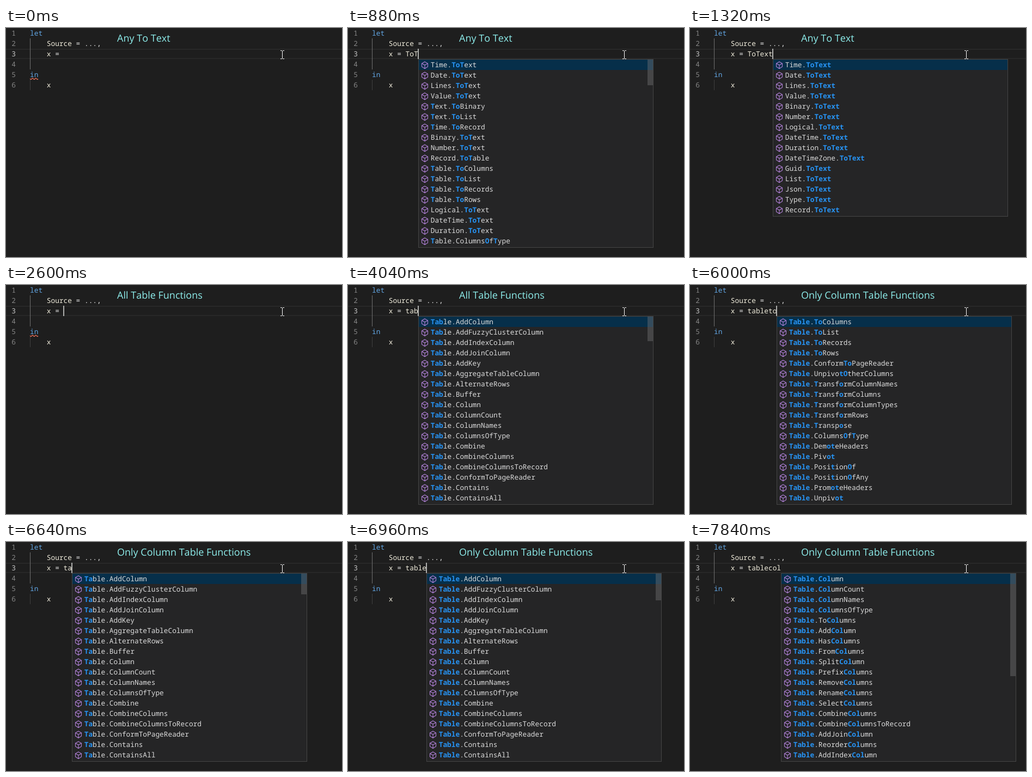
These frames come from a looping animation (617 px wide and 420 px high, 8 s). An HTML page:

```html
<!DOCTYPE html>
<html lang="en">
<head>
<meta charset="utf-8">
<title>Code completion</title>
<style>
  html, body { margin: 0; width: 100%; height: 100%; overflow: hidden; background: #1e1e1e; }
  #stage {
    position: relative; width: 617px; height: 420px; overflow: hidden; background: #1e1e1e;
    color: #dcdcdc; font: 12.82px/19px "Noto Sans Mono", "DejaVu Sans Mono", monospace;
    text-rendering: geometricPrecision; font-variant-ligatures: none; white-space: pre;
  }
  #stage > * { position: absolute; }
  #numbers { left: 0; top: 0; width: 18px; text-align: right; color: #858585; }
  #numbers b { color: #c6c6c6; font-weight: 400; }
  #line { left: 0; top: 38px; width: 617px; height: 19px; box-sizing: border-box; border: solid #282828; border-width: 2px 0; }
  #code { left: 44px; top: 0; color: #ececec; font-weight: 500; }
  #code i { color: #62a6e4; font-style: normal; font-weight: 400; }
  #code u { color: #f0ecdc; text-decoration: none; }
  .guide { left: 44px; width: 1px; }
  #caret { top: 38px; width: 2px; height: 19px; background: #aeafad; }
  #title { left: 204px; top: 7px; color: #8eeeec; font: 18px/24px "Open Sans", "Noto Sans", sans-serif; font-kerning: none; }
  #menu { top: 57px; width: 432px; box-sizing: border-box; background: #252526; border: 1px solid #454545; }
  .row { position: relative; height: 19px; padding-left: 21.7px; }
  .row:first-child { background: #062f4a; }
  .row svg { position: absolute; left: 4px; top: 3px; }
  .row b { color: #2794f5; font-weight: 600; }
  #thumb { position: absolute; right: 0; top: 0; width: 10px; background: rgba(121, 121, 121, .4); }
  #marks { left: 0; top: 0; fill: none; }
</style>
</head>
<body>
<div id="stage">
  <div id="line"></div>
  <div id="numbers">1
2
<b>3</b>
4
5
6</div>
  <div class="guide" style="top:19px;height:57px;background:#707070"></div>
  <div class="guide" style="top:95px;height:19px;background:#404040"></div>
  <div id="code"><i>let</i>
    <u>Source</u> = ...,
    <u>x</u> = <u id="typed"></u>

<i>in</i>
    <u>x</u></div>
  <div id="caret"></div>
  <div id="title"></div>
  <div id="menu"></div>
  <svg id="marks" width="617" height="420">
    <path id="squiggle" d="M44 93l1.800 1.500 3-2.400 3 2.400 3-2.400 3 2.400 1.200-1" stroke="#f4745c" stroke-width="1.2"/>
    <path d="M504 41.5h2.5l1 1 1-1h2.5M507.5 42v14M504 56.5h2.5l1-1 1 1h2.5" stroke="#fff"/>
  </svg>
</div>
<script>
const LOOP = 8000, LEFT = 44, CHAR = 7.68, ROW = 19;
const $ = id => document.getElementById(id);
const words = s => s.trim().split(/\s+/);
const CUBE = '<svg width="14" height="14" fill="none" stroke="#b180d7" stroke-width="1.1">' +
  '<path d="M7 1l5.5 3v6L7 13.500l-5.500-3.500V4zM1.500 4L7 7l5.500-3M7 7v6.500"/></svg>';

// Segments between bars are the highlighted matches.
const toText = words('Time Date Lines Value').map(n => n + '.|ToT|ext');
const convert = [
  ...toText, ...words(`|T|ext.|To|Binary |T|ext.|To|List |T|ime.|To|Record Binary.|ToT|ext Number.|ToT|ext
  Record.|ToT|able |T|able.|To|Columns |T|able.|To|List |T|able.|To|Records |T|able.|To|Rows
  Logical.|ToT|ext DateTime.|ToT|ext Duration.|ToT|ext |T|able.Columns|O|f|T|ype`)];
const textOwners = words(`Time Date Lines Value Binary Number Logical DateTime Duration DateTimeZone
  Guid List Json Type Record`);
const tables = words(`AddColumn AddFuzzyClusterColumn AddIndexColumn AddJoinColumn AddKey
  AggregateTableColumn AlternateRows Buffer Column ColumnCount ColumnNames ColumnsOfType Combine
  CombineColumns CombineColumnsToRecord ConformToPageReader Contains ContainsAll`);
const tableTo = words(`|To|Columns |To|List |To|Records |To|Rows Conform|To|PageReader
  Unpivo|tO|therColumns |T|ransf|o|rmColumnNames |T|ransf|o|rmColumns |T|ransf|o|rmColumnTypes
  |T|ransf|o|rmRows |T|ransp|o|se Columns|O|f|T|ype Dem|ot|eHeaders Piv|ot| Posi|t|ion|O|f
  Posi|t|ion|O|fAny Prom|ot|eHeaders Unpiv|ot|`);
const tableCo = words(`Column ColumnCount ColumnNames ColumnsOfType Combine CombineColumns
  CombineColumnsToRecord ConformToPageReader Contains ContainsAll ContainsAny ToColumns AddColumn
  HasColumns FromColumns SplitColumn PrefixColumns RemoveColumns`);
const tableCol = words(`Column ColumnCount ColumnNames ColumnsOfType ToColumns AddColumn HasColumns
  FromColumns SplitColumn PrefixColumns RemoveColumns RenameColumns SelectColumns CombineColumns
  CombineColumnsToRecord AddJoinColumn ReorderColumns AddIndexColumn`);
const thumbs = { t: 24, ta: 38, tab: 45, tabl: 47, table: 49, tablec: 100, tableco: 130, tablecol: 188,
  T: 24, To: 36, ToT: 47 };

const bar = (name, part) => name.replace(part, '|' + part + '|');

function matches(text) {
  if (text === 'To') return convert.map(n => n.replace('|ToT|', '|To|T'));
  if (text === 'ToT') return convert;
  if (/^ToTe/.test(text)) return textOwners.map(n => bar(n + '.ToText', text));
  if (/^tablet/.test(text)) {
    return tableTo.map(n => '|Table|.' + (text === 'tablet' ? n.replace('|To|', '|T|o') : n));
  }
  if (/^tablec/.test(text)) {
    const part = 'Col'.slice(0, text.length - 5);
    return (text === 'tablecol' ? tableCol : tableCo).map(n => '|Table|.' + bar(n, part));
  }
  return tables.map(n => bar('Table.' + n, 'Table'.slice(0, text.length)));
}

// Each entry: start time, typed text, caret visible.
const steps = [
  [0, '', 0], [320, 'T', 1], [560, 'To', 1], [880, 'ToT', 1], [1080, 'ToTe', 1], [1200, 'ToTex', 1],
  [1320, 'ToText', 1], [1840, 'ToText', 0], [2280, 'ToText', 1],
  [2600, '', 1], [3040, '', 0], [3600, 't', 1], [3800, 'ta', 1], [4040, 'tab', 1], [4120, 'tabl', 1],
  [4240, 'table', 1], [4560, 'tablet', 1], [4680, 'tableto', 1], [5240, 'tableto', 0], [5640, 'tableto', 1],
  [6200, '', 1], ...[...'tablecol'].map((c, i) =>
    [i ? 6480 + 120 * i : 6520, 'tablecol'.slice(0, i + 1), 1]), [7840, 'tablecol', 0]
];
const titles = [[0, 'Any To Text'], [2600, 'All Table Functions'], [4560, 'Only Column Table Functions']];

const at = (list, t) => list.filter(s => s[0] <= t).pop();
const rowHtml = name => '<div class="row">' + CUBE +
  name.split('|').map((s, i) => i % 2 ? `<b>${s}</b>` : s).join('') + '</div>';

function drawMenu(text, left) {
  const menu = $('menu');
  menu.hidden = !text;
  if (!text) return;
  const rows = matches(text);
  menu.style.left = left + 'px';
  menu.style.height = rows.length * ROW + 4 + 'px';
  menu.innerHTML = rows.map(rowHtml).join('') + `<div id="thumb" style="height:${thumbs[text] || 0}px"></div>`;
}

let shown;
function frame(now) {
  const t = now % LOOP, step = at(steps, t);
  if (step !== shown) {
    const [, text, on] = shown = step;
    const x = Math.round(LEFT + (8 + text.length) * CHAR - .75);
    $('typed').textContent = text;
    $('title').textContent = at(titles, t)[1];
    $('caret').style.left = x + 'px';
    $('caret').style.opacity = on;
    $('squiggle').style.display = text ? 'none' : '';
    drawMenu(text, x + 1);
  }
  requestAnimationFrame(frame);
}
frame(performance.now());
</script>
</body>
</html>
```
